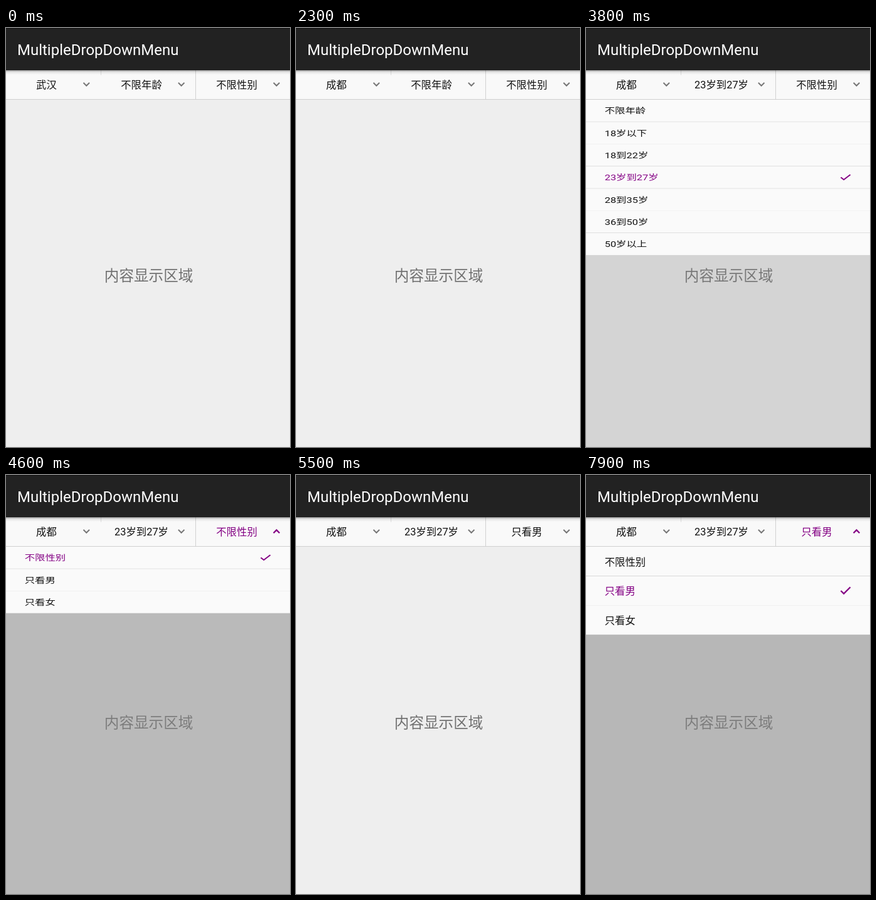
Recreate the animation shown at these times as an HTML page. Size 453 px wide and 666 px high, loop 8000 ms.

```html
<!DOCTYPE html>
<html lang="zh-CN">
<head>
<meta charset="utf-8">
<style>
html, body { margin: 0; width: 100%; height: 100%; overflow: hidden; background: #eee; }
svg { display: block; width: 453px; height: 666px; }
text { font: 16.4px Roboto, "Noto Sans CJK SC", "Noto Sans CJK", sans-serif; fill: #111; }
.title { font-size: 24px; fill: #fff; }
.content { font-size: 23.6px; fill: #707070; }
.tab, .content { text-anchor: middle; }
path { fill: none; stroke: #777; stroke-width: 2; }
.on { fill: #840084; }
path.on, .tick { fill: none; stroke: #840084; stroke-width: 2.3; }
</style>
</head>
<body>
<svg viewBox="0 0 453 666">
  <defs>
    <linearGradient id="shade" x2="0" y2="1">
      <stop offset="0" stop-color="#000" stop-opacity=".42"/>
      <stop offset=".4" stop-color="#000" stop-opacity=".09"/>
      <stop offset="1" stop-color="#000" stop-opacity="0"/>
    </linearGradient>
  </defs>
  <rect width="453" height="666" fill="#eee"/>
  <text class="content" x="227.6" y="402">内容显示区域</text>
  <rect id="mask" y="113" width="453" height="553" fill="#888"/>
  <g id="menus"></g>
  <rect y="67" width="453" height="46" fill="#f9f9f9"/>
  <rect y="113" width="453" height="1" fill="#d0d0d0"/>
  <rect x="151" y="67" width="1" height="8" fill="#ddd"/>
  <rect x="302" y="67" width="1" height="46" fill="#d2d2d2"/>
  <g id="tabs"></g>
  <rect y="67" width="453" height="7" fill="url(#shade)"/>
  <rect width="453" height="67" fill="#222"/>
  <rect width="453" height="1" fill="#111"/>
  <rect y="66" width="453" height="1" fill="#181818"/>
  <text class="title" x="18" y="43">MultipleDropDownMenu</text>
</svg>
<script>
const LOOP = 8000, TOP = 113.3, ROW = 46.67;
const lists = [
  '武汉 北京 上海 成都 广州 深圳 重庆 天津 西安 南京 杭州',
  '不限年龄 18岁以下 18到22岁 23岁到27岁 28到35岁 36到50岁 50岁以上',
  '不限性别 只看男 只看女'
].map(s => s.split(' '));
const tabX = [64.5, 216, 368], arrowX = [128.3, 279.7, 431.5];
const lineColors = ['#d6d6d6', '#dadada', '#f0f0f0'];

// Height and mask strength of the panel while it moves or rests
const START = [.2, .35], OPENING = [.757, .945], OPEN = [1, 1], CLOSING = [.757, .49], CLOSED = [0, 0];
const steps = [
  [0, 0, CLOSED], [900, 0, START], [1000, 0, OPENING], [1100, 0, OPEN], [2200, 0, CLOSING], [2300, 0, CLOSED],
  [2900, 1, OPENING], [3000, 1, OPEN], [3800, 1, CLOSING], [3900, 1, CLOSED],
  [4600, 2, OPENING], [4700, 2, OPEN], [5400, 2, CLOSING], [5500, 2, CLOSED],
  [6200, 0, OPENING], [6300, 0, OPEN], [7000, 1, OPEN], [7900, 2, OPEN]
];
const choices = [[2200, 3], [3800, 3], [5400, 1]];

function add(parent, tag, attrs, text = '') {
  const el = document.createElementNS('http://www.w3.org/2000/svg', tag);
  for (const key in attrs) el.setAttribute(key, attrs[key]);
  el.textContent = text;
  return parent.appendChild(el);
}

const mask = document.getElementById('mask');
const menuLayer = document.getElementById('menus');
const tabLayer = document.getElementById('tabs');

const menus = lists.map(items => {
  const group = add(menuLayer, 'g', {});
  add(group, 'rect', { y: TOP, width: 453, height: ROW * items.length + .4, fill: '#fafafa' });
  const labels = items.map((item, i) => {
    if (i) add(group, 'rect', {
      y: Math.round(TOP + ROW * i), width: 453, height: 1, fill: lineColors[i % 3]
    });
    return add(group, 'text', { x: 29.7, y: 143.7 + ROW * i }, item);
  });
  const tick = add(group, 'path', { class: 'tick', d: 'M406.5 137.3L411.2 142L421.6 131.6' });
  return { group, labels, tick };
});

const tabs = tabX.map((x, i) => ({
  label: add(tabLayer, 'text', { class: 'tab', x, y: 95.7 }),
  arrow: add(tabLayer, 'path', {})
}));

function render(t) {
  const [, current, [scale, dim]] = steps.findLast(step => step[0] <= t);
  const closing = steps.findLast(step => step[0] <= t)[2] === CLOSING;
  mask.setAttribute('opacity', dim * .533);
  menus.forEach(({ group, labels, tick }, i) => {
    const picked = t >= choices[i][0] ? choices[i][1] : 0;
    const shown = i === current && scale > 0;
    const active = shown && !closing;
    group.style.display = shown ? '' : 'none';
    group.setAttribute('transform', `translate(0 ${TOP * (1 - scale)}) scale(1 ${scale})`);
    labels.forEach((label, k) => label.classList.toggle('on', k === picked));
    tick.setAttribute('transform', `translate(0 ${ROW * picked})`);

    const { label, arrow } = tabs[i];
    label.textContent = lists[i][picked];
    label.classList.toggle('on', active);
    arrow.classList.toggle('on', active);
    const [y, dy] = active ? [92.3, -4.8] : [87, 4.8];
    arrow.setAttribute('d', `M${arrowX[i] - 4.8} ${y}l4.8 ${dy}l4.8 ${-dy}`);
  });
}

const began = performance.now();
function frame() {
  render((performance.now() - began) % LOOP);
  requestAnimationFrame(frame);
}
frame();
</script>
</body>
</html>
```
